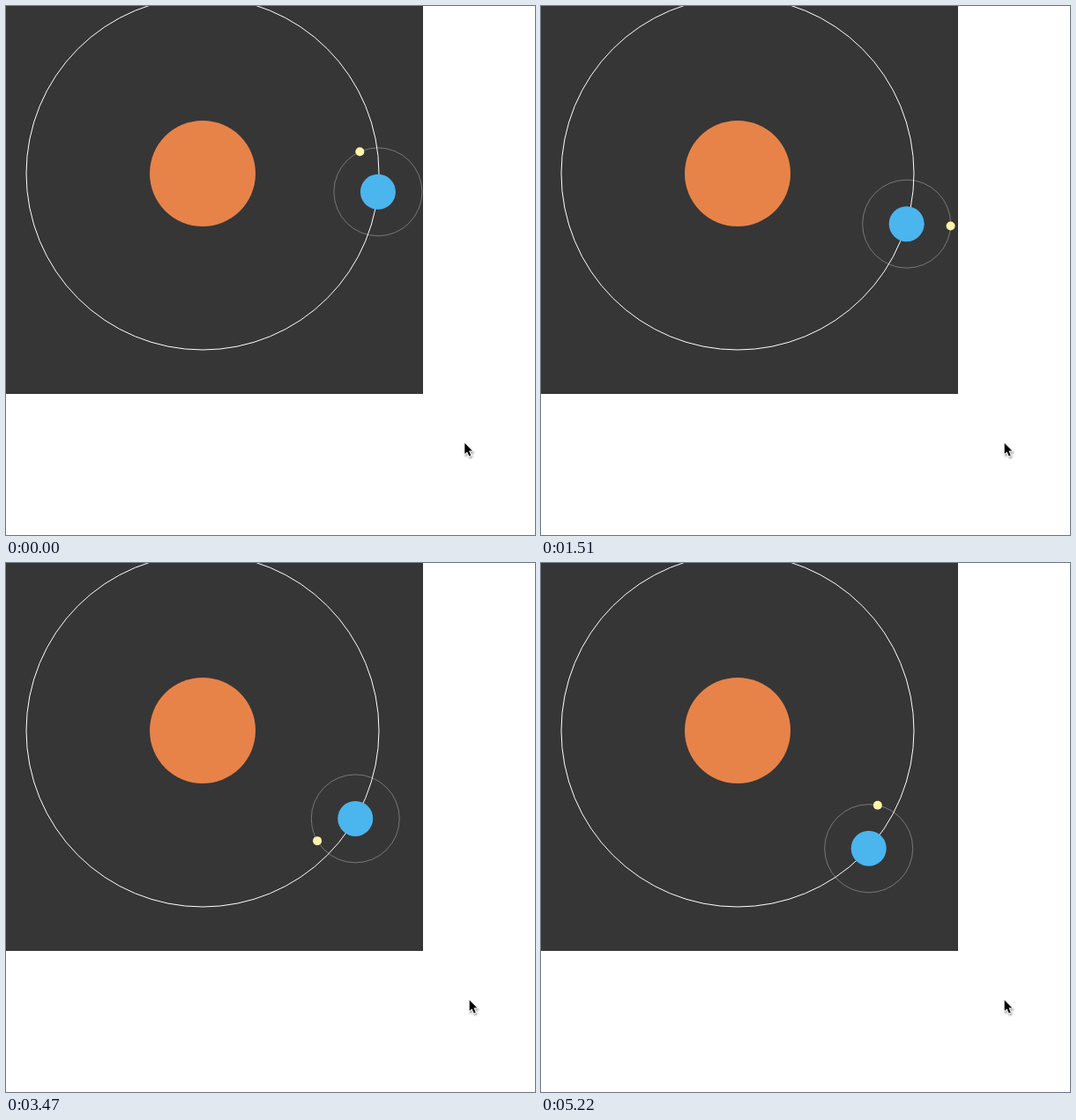
Write an HTML page that moves like this. It is 600 by 600 pixels and loops after 5.32 s.

```html
<!DOCTYPE html>
<html lang="en">
<head>
<meta charset="utf-8">
<title>Orbits</title>
<style>
  html, body { margin: 0; width: 100%; height: 100%; overflow: hidden; background: #fff; }
  svg { display: block; }
</style>
</head>
<body>
<svg width="600" height="600" viewBox="0 0 600 600">
  <defs>
    <filter id="soft" x="-50%" y="-50%" width="200%" height="200%">
      <feGaussianBlur stdDeviation="1.1"/>
    </filter>
    <path id="arrow" d="M0 0V12.2L2.8 9.6L5 14.8L7 13.9L4.8 8.8H8.6Z"/>
  </defs>
  <rect width="473" height="440" fill="#363636"/>
  <circle cx="223" cy="190" r="200" fill="none" stroke="#fff"/>
  <circle cx="223" cy="190" r="60" fill="#e78349"/>
  <g id="planet">
    <circle r="50" fill="none" stroke="#fff" stroke-opacity=".32"/>
    <circle r="20" fill="#4bb5ee"/>
    <circle id="moon" r="5" fill="#fcf4a9"/>
  </g>
  <g id="cursor">
    <use href="#arrow" x="1" y="2" fill="#000" stroke="#000" stroke-width="1.5" opacity=".4" filter="url(#soft)"/>
    <use href="#arrow" fill="#000" stroke="#fff" stroke-width="2" stroke-linejoin="round" paint-order="stroke"/>
  </g>
</svg>
<script>
  const LOOP = 5320;
  const START = 5.973;       // planet angle in degrees
  const STEP = 3 / 11;       // planet degrees per step
  // [time in ms, steps taken]
  const PACE = [[80, 2], [950, 25], [1190, 31], [3990, 101], [4360, 110], [4560, 115], [5060, 128], [5220, 132]];

  const planet = document.getElementById("planet");
  const moon = document.getElementById("moon");
  const cursor = document.getElementById("cursor");

  function stepsAt(t) {
    if (t < PACE[0][0]) return 0;
    for (let i = 1; i < PACE.length; i++) {
      const [t0, n0] = PACE[i - 1], [t1, n1] = PACE[i];
      if (t < t1) return Math.floor(n0 + (n1 - n0) * (t - t0) / (t1 - t0) + 1e-6);
    }
    return PACE[PACE.length - 1][1];
  }

  function place(el, x, y) {
    el.setAttribute("transform", `translate(${x.toFixed(3)} ${y.toFixed(3)})`);
  }

  function orbit(el, cx, cy, r, degrees) {
    const a = degrees * Math.PI / 180;
    place(el, cx + r * Math.cos(a), cy + r * Math.sin(a));
  }

  function draw(t) {
    const angle = START + stepsAt(t) * STEP;
    orbit(planet, 223, 190, 200, angle);
    orbit(moon, 0, 0, 50, 180 + 11 * angle);
    place(cursor, t < 80 ? 520.3 : 525.7, 495.8);
  }

  const begin = performance.now();
  function tick() {
    draw((performance.now() - begin) % LOOP);
    requestAnimationFrame(tick);
  }
  draw(0);
  requestAnimationFrame(tick);
</script>
</body>
</html>
```
